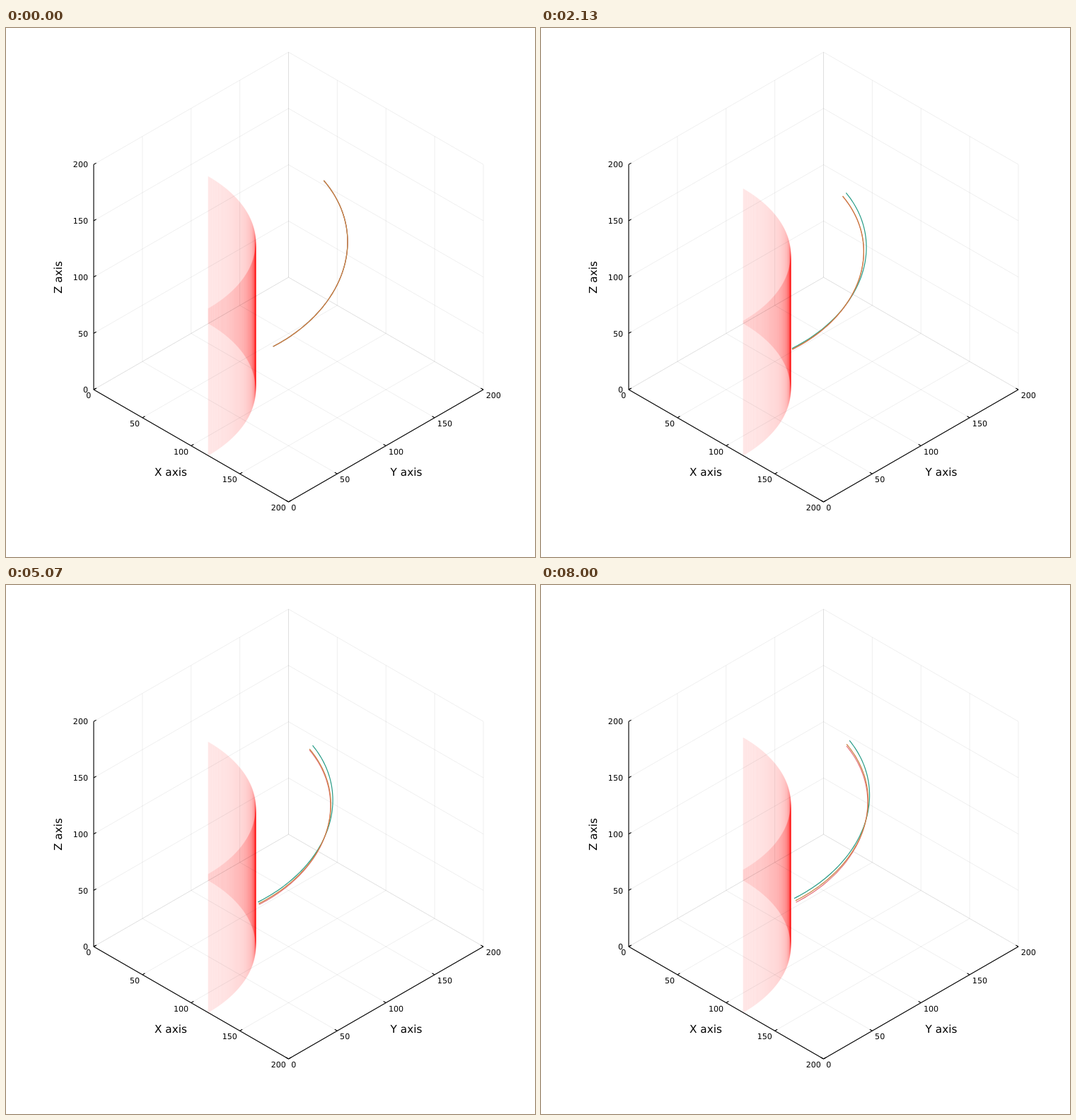
Write an HTML page with a canvas that moves like this. It is 748x749 px and loops after 8070 ms.

```html
<!DOCTYPE html>
<html lang="en">
<head>
<meta charset="utf-8">
<title>3D axes</title>
<style>
html, body { margin: 0; width: 100%; height: 100%; overflow: hidden; background: #fff; }
canvas { display: block; }
</style>
</head>
<body>
<canvas id="stage" width="748" height="749"></canvas>
<script>
const ctx = document.getElementById('stage').getContext('2d');
const LOOP = 8070, STEPS = 121;
const MAX = 200, TICKS = [0, 50, 100, 150, 200];
const RADIUS = 117.6, WALL_LINES = 400;
const HIT = 940, SETTLE = 600; // ms: end of the fall, decay of the rebound
const FONT = '"DejaVu Sans", Verdana, sans-serif';

// Strand pose: top x, top y, bottom x, bottom y, rightmost x
const START = [449.3, 216, 377.7, 451, 483];
const REBOUND = [3.4, -6.6, 3.3, -4.1, 3.4];
const OUTER = [433.3, 230.6, 357, 452.2, 462];
const INNER = [428.3, 235, 357, 453, 458];
const STRANDS = [
  { color: '#269b86', hit: OUTER, end: [436.2, 220, 358, 443.6, 464.6] },
  { color: '#e5707c', hit: INNER, end: [432, 227.8, 360.6, 449.2, 462] },
  { color: '#c9833f', hit: INNER, end: [432.2, 225.2, 360, 446.8, 462.7] }
];

const mix = (a, b, u) => a + (b - a) * u;

const project = (x, y, z) =>
  [124 + (x + y) * 1.3775, 512 + (x - y) * 0.795 - z * 1.594];

// Accelerated fall, then a steady drift with a decaying rebound
function motion(t, start, hit, end, rebound) {
  if (t < HIT) return mix(start, hit, (t / HIT) ** 1.8);
  const age = t - HIT;
  return mix(hit - rebound, end, age / (LOOP - HIT)) +
    rebound * Math.exp(-age / SETTLE);
}

function line(a, b) {
  ctx.beginPath();
  ctx.moveTo(...a);
  ctx.lineTo(...b);
  ctx.stroke();
}

function text(str, x, y, size, align) {
  ctx.font = size + 'px ' + FONT;
  ctx.textRendering = 'geometricPrecision';
  ctx.textAlign = align;
  ctx.fillText(str, x, y);
}

function drawGrid() {
  ctx.strokeStyle = 'rgba(0,0,0,0.085)';
  ctx.lineWidth = 0.8;
  for (const v of TICKS) {
    line(project(v, 0, 0), project(v, MAX, 0));
    line(project(0, v, 0), project(MAX, v, 0));
    line(project(0, v, 0), project(0, v, MAX));
    line(project(0, 0, v), project(0, MAX, v));
    line(project(v, MAX, 0), project(v, MAX, MAX));
    line(project(0, MAX, v), project(MAX, MAX, v));
  }
}

function drawAxes() {
  ctx.strokeStyle = ctx.fillStyle = '#000';
  ctx.lineWidth = 1.1;
  line(project(0, 0, 0), project(0, 0, MAX));
  line(project(0, 0, 0), project(MAX, 0, 0));
  line(project(MAX, 0, 0), project(MAX, MAX, 0));
  const len = 2.6;
  for (const v of TICKS) {
    const px = project(v, 0, 0), py = project(MAX, v, 0), pz = project(0, 0, v);
    line(px, project(v, len, 0));
    line(py, project(MAX - len, v, 0));
    line(pz, project(0, len, v));
    text(v, px[0] - 3.7, px[1] + 12, 11.1, 'right');
    text(v, py[0] + 3.7, py[1] + 12, 11.1, 'left');
    text(v, 116, pz[1] + 4.2, 11.1, 'right');
  }
  text('X axis', 233, 634, 15.28, 'center');
  text('Y axis', 566, 634, 15.28, 'center');
  ctx.save();
  ctx.translate(78.5, 353);
  ctx.rotate(-Math.PI / 2);
  text('Z axis', 0, 0, 15.28, 'center');
  ctx.restore();
}

// Quarter cylinder of translucent vertical lines
function drawWall(top) {
  const height = (project(0, RADIUS, 0)[1] - top) / 1.594;
  ctx.strokeStyle = 'rgba(255,0,0,0.062)';
  ctx.lineWidth = 1;
  for (let i = 0; i <= WALL_LINES; i++) {
    const a = i / WALL_LINES * Math.PI / 2;
    const x = RADIUS * Math.cos(a), y = RADIUS * Math.sin(a);
    line(project(x, y, 0), project(x, y, height));
  }
}

// Quarter of a tilted ellipse through both ends, touching x = right
function drawStrand([tx, ty, bx, by, right], color) {
  const h = Math.SQRT1_2, mx = (tx + bx) / 2, my = (ty + by) / 2;
  const sx = (bx - tx) * h, sy = (by - ty) * h, k = right - mx;
  const cx = Math.SQRT2 * k + Math.sqrt(4 * k * k - 2 * sx * sx), cy = 26;
  ctx.strokeStyle = color;
  ctx.lineWidth = 1.2;
  ctx.beginPath();
  for (let i = 0; i <= 80; i++) {
    const a = (i / 80 - 0.5) * Math.PI / 2;
    const c = Math.cos(a) - h, s = Math.sin(a);
    ctx.lineTo(mx + cx * c + sx * s, my + cy * c + sy * s);
  }
  ctx.stroke();
}

function draw(t) {
  ctx.fillStyle = '#fff';
  ctx.fillRect(0, 0, 748, 749);
  drawGrid();
  drawAxes();
  drawWall(motion(t, 210, 224.4, 215.8, -6.3));
  for (const { color, hit, end } of STRANDS) {
    drawStrand(START.map((v, j) => motion(t, v, hit[j], end[j], REBOUND[j])), color);
  }
}

const start = performance.now();
let shown = -1;

function tick() {
  const t = (performance.now() - start) % LOOP;
  const step = Math.min(STEPS - 1, Math.floor((t + 3) / LOOP * STEPS));
  if (step !== shown) {
    shown = step;
    draw(step * LOOP / STEPS);
  }
  requestAnimationFrame(tick);
}
tick();
</script>
</body>
</html>
```
